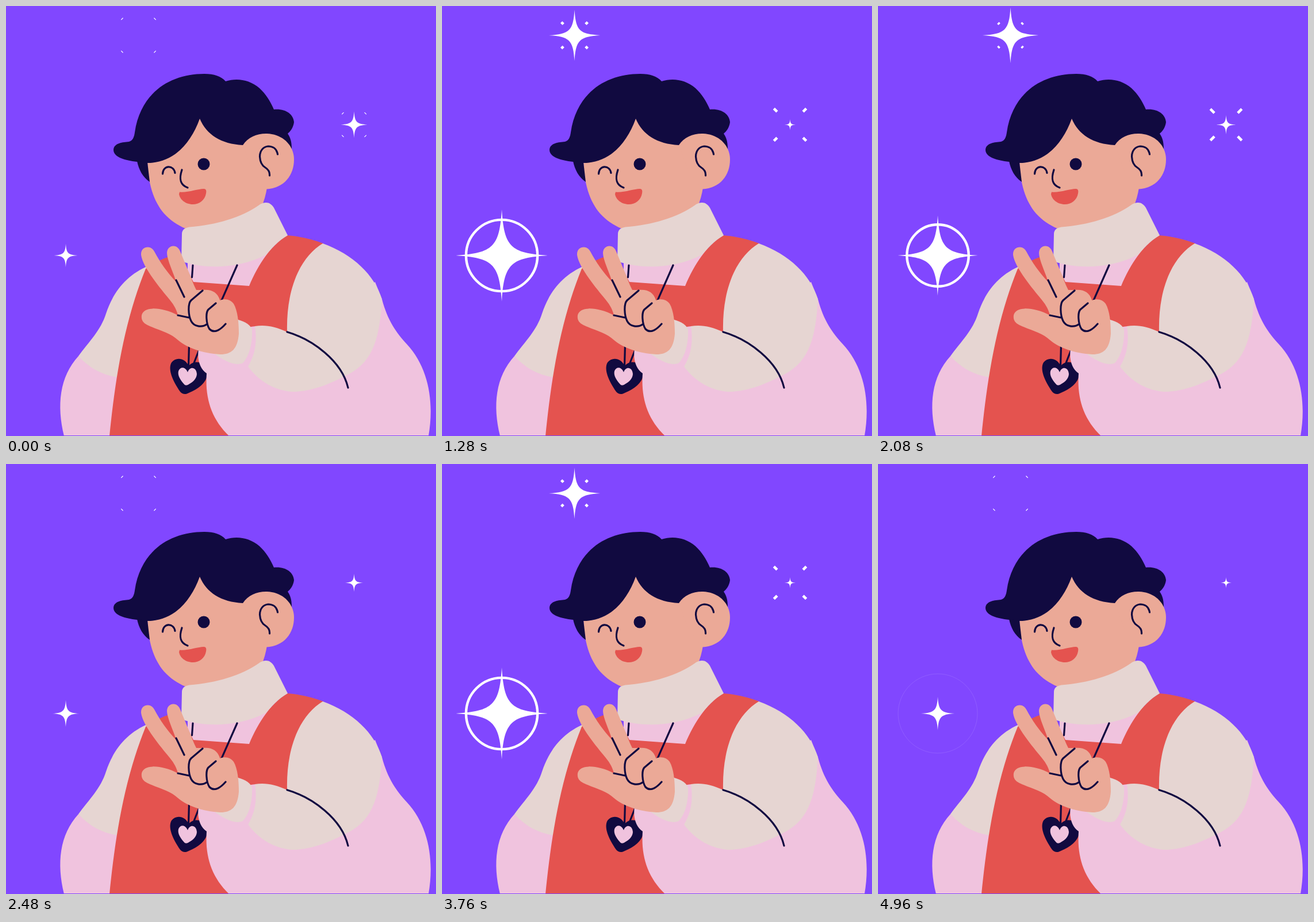
These frames come from a looping animation (748 px wide and 748 px high, 5040 ms). An HTML page:

```html
<!DOCTYPE html>
<html lang="en">
<head>
<meta charset="utf-8">
<title>Peace sign</title>
<style>
  html, body { margin: 0; width: 100%; height: 100%; overflow: hidden; background: #8147ff; }
  svg { display: block; width: 100vw; height: 100vh; }
  .back { fill: #8147ff; }
  .navy { fill: #110a40; }
  .skin { fill: #eba997; }
  .red { fill: #e4534f; }
  .cream { fill: #e6d5d2; }
  .pink { fill: #f0c3de; }
  .line { fill: none; stroke: #110a40; stroke-width: 3.2; stroke-linecap: round; stroke-linejoin: round; }
  .spark { fill: #fff; }
  .ray { fill: none; stroke: #fff; stroke-width: 4.6; }
</style>
</head>
<body>
<svg viewBox="0 0 748 748">
  <!-- far sleeve -->
  <path class="cream" d="M250 451C208 468 186 499 174 535C165 564 145 583 126 609L150 650L200 650L240 500Z"/>
  <path class="pink" d="M126 609C93 645 88 695 101 748H184L194 646C168 642 145 630 126 609Z"/>

  <!-- shirt and apron -->
  <path class="pink" d="M316 440L480 420L450 490H316Z"/>
  <path class="red" d="M243 457C258 446 276 438 300 430L326 480L423 487C438 450 464 412 490 399C513 401 534 406 552 413L500 580V748H180C189 660 203 555 243 457Z"/>

  <!-- head -->
  <path class="skin" d="M246 268C247 310 257 340 275 361C286 373 298 381 312 387C370 392 415 375 444 350C449 340 452 328 454 316L470 240L337 190Z"/>
  <path class="cream" d="M306 397C306 389 311 386 319 384.500C365 381 410 368 442 345C452 339 461 342 466 351L490 399C474 408 460 424 452 433C406 456 350 459 305 444Z"/>
  <path class="navy" d="M246 273C240 273 234 272 228 271C203 268 187 262 187 250C188 238 203 237 214 236C221 234 223 227 224 220C234 151 285 118 345 118C362 118 374 122 382 131C402 125 423 128 441 143C452 153 460 166 466 180C486 178 500 188 501 202C500 211 495 218 490 222C495 229 497 237 497 248L450 262L412 242C374 240 349 224 337 196C321 240 291 273 246 273Z"/>
  <path class="navy" d="M228 270C231 285 238 298 250 306L246 272Z"/>
  <path class="skin" d="M412 242C421 228 437 221.500 454 222C482 223 501 243 501 267C501 294 484 317 453 318.500L430 290Z"/>
  <path class="line" d="M472.500 258C471 248 464 244 456 244C447 245 441.500 252 441.500 262C442 272 446 278 451 281C456 284 459 289 458.500 295"/>
  <circle class="navy" cx="344" cy="275" r="10.500"/>
  <path class="line" d="M272.500 292C273 276 292 276 294 290.500M306 285C301 300 302 311 316 316"/>
  <path class="red" d="M302 323.500C316 325 334 318 344 318C348 318 349 321 348 326C346 338 336 345 325 345C312 345 302 336 301 327Z"/>

  <!-- necklace -->
  <path class="line" d="M325 451L323.500 472M402 451L375 512M318.500 590L317.500 626M336 598L325 626"/>
  <path class="navy" d="M318 626C311 612 296 610 288 620C281 632 290 652 303 671C307 676 313 676 318 673C333 667 350 655 350 640C350 619 328 614 318 626Z"/>
  <path class="pink" d="M316 637C312 627 303 627 300 635C298 643 304 651 309 657C312 661 315 660 318 658C326 654 332 647 332 640C331 628 320 626 316 637Z"/>

  <!-- near arm -->
  <path class="pink" d="M335 596C332 616 338 632 349 639C346 682 357 718 388 748H735C745 690 736 630 697 588C679 568 664 548 654 510L642 480L520 580L434 557L426 558L400 590Z"/>
  <path class="cream" d="M551 413C604 432 641 468 654 510C650 575 640 617 597 640C557 661 528 671 497 671C462 668 436 648 421 627C434 606 437 582 433 557C450 554 468 557 489 567C487 490 513 436 551 413Z"/>
  <path class="cream" d="M396 544C412 547 423 552 428 562C429 587 423 609 412 621C399 627 380 618 360 603Z"/>
  <path class="line" d="M489 567C533 580 584 617 595 664"/>

  <!-- hand -->
  <path class="skin" d="M235 433C234 418 252 415 258 427C268 446 281 464 296 480C292 465 280 442 280 429C281 415 298 413 303 427L321 470C324 479 328 488 331 494L342 494C358 492 369 499 372 512C382 508 391 511 396 518C403 530 405 550 405 570C403 597 392 606 373 606C342 604 315 595 299 581C287 569 263 563 246 555C238 551 235 546 236 538C239 522 270 523 299 538C295 520 284 511 271 494C255 474 237 449 235 433Z"/>
  <path class="line" d="M296 477L310 506M299 538L318 542M342 495L322 512C316 518 317 538 322 548C327 558 341 560 350 553M365 517L352 528C347 533 348 553 354 562C363 571 374 562 382 553"/>

  <rect class="back" y="747" width="748" height="1"/>
  <g id="sparks"></g>
</svg>
<script>
const LOOP = 5040, STEP = 80, CYCLE = 25, LAST = 148;
const box = document.getElementById('sparks');

function add(tag, cls, parent = box) {
  const el = document.createElementNS('http://www.w3.org/2000/svg', tag);
  el.setAttribute('class', cls);
  return parent.appendChild(el);
}

// sine ease from 0 to 1 while x runs from a to b
function ease(a, b, x) {
  const u = Math.min(1, Math.max(0, (x - a) / (b - a)));
  return (1 - Math.cos(Math.PI * u)) / 2;
}

const mod = (a, n) => ((a % n) + n) % n;

function starPath(r) {
  const a = 0.05 * r, b = 0.19 * r;
  return `M0 ${-r}C${a} ${-b} ${b} ${-a} ${r} 0C${b} ${a} ${a} ${b} 0 ${r}` +
    `C${-a} ${b} ${-b} ${a} ${-r} 0C${-b} ${-a} ${-a} ${-b} 0 ${-r}Z`;
}

function place(x, y) {
  const g = add('g', '');
  g.setAttribute('transform', `translate(${x} ${y})`);
  return g;
}

// star that shrinks while four rays shoot out diagonally
function twinkle(x, y, peak) {
  const g = place(x, y), star = add('path', 'spark', g), rays = add('path', 'ray', g);
  return k => {
    const p = mod(k - peak + 10, CYCLE) - 10;
    star.setAttribute('d', starPath(50 * Math.min(ease(-11.3, -0.8, p), 1 - ease(0, 9.4, p))));
    const to = 19.3 + 9.7 * Math.max(0.08, ease(-3, 9, p));
    const from = Math.min(19.3 + 9.5 * ease(4.5, 10, p), to - 0.8);
    let d = '';
    if (p > -7) {
      for (const sx of [-1, 1]) for (const sy of [-1, 1])
        d += `M${sx * from} ${sy * from}L${sx * to} ${sy * to}`;
    }
    rays.setAttribute('d', d);
  };
}

// big star with a ring that opens, then thins away
function ringed(x, y) {
  const g = place(x, y), ring = add('circle', 'ray', g), star = add('path', 'spark', g);
  return k => {
    const p = k < 2 ? k + CYCLE : k;
    star.setAttribute('d', starPath(20 + 72 * Math.min(ease(6.2, 15.5, p), 1 - ease(14.7, 25.5, p))));
    ring.setAttribute('r', 69 * ease(5.6, 14.9, p));
    const width = Math.max(0.12, 4.4 * (1 - ease(14, 22, p)));
    ring.style.strokeWidth = p > 5.6 && p < 24 ? width : 0;
  };
}

const sparks = [twinkle(230.5, 51, 11), twinkle(605.5, 206.5, 6.3), ringed(104, 434)];

function draw() {
  const step = Math.floor((performance.now() % LOOP) / STEP);
  const k = Math.min(LAST, Math.round(step * STEP * 0.03)) % CYCLE;
  sparks.forEach(s => s(k));
  requestAnimationFrame(draw);
}
draw();
</script>
</body>
</html>
```
